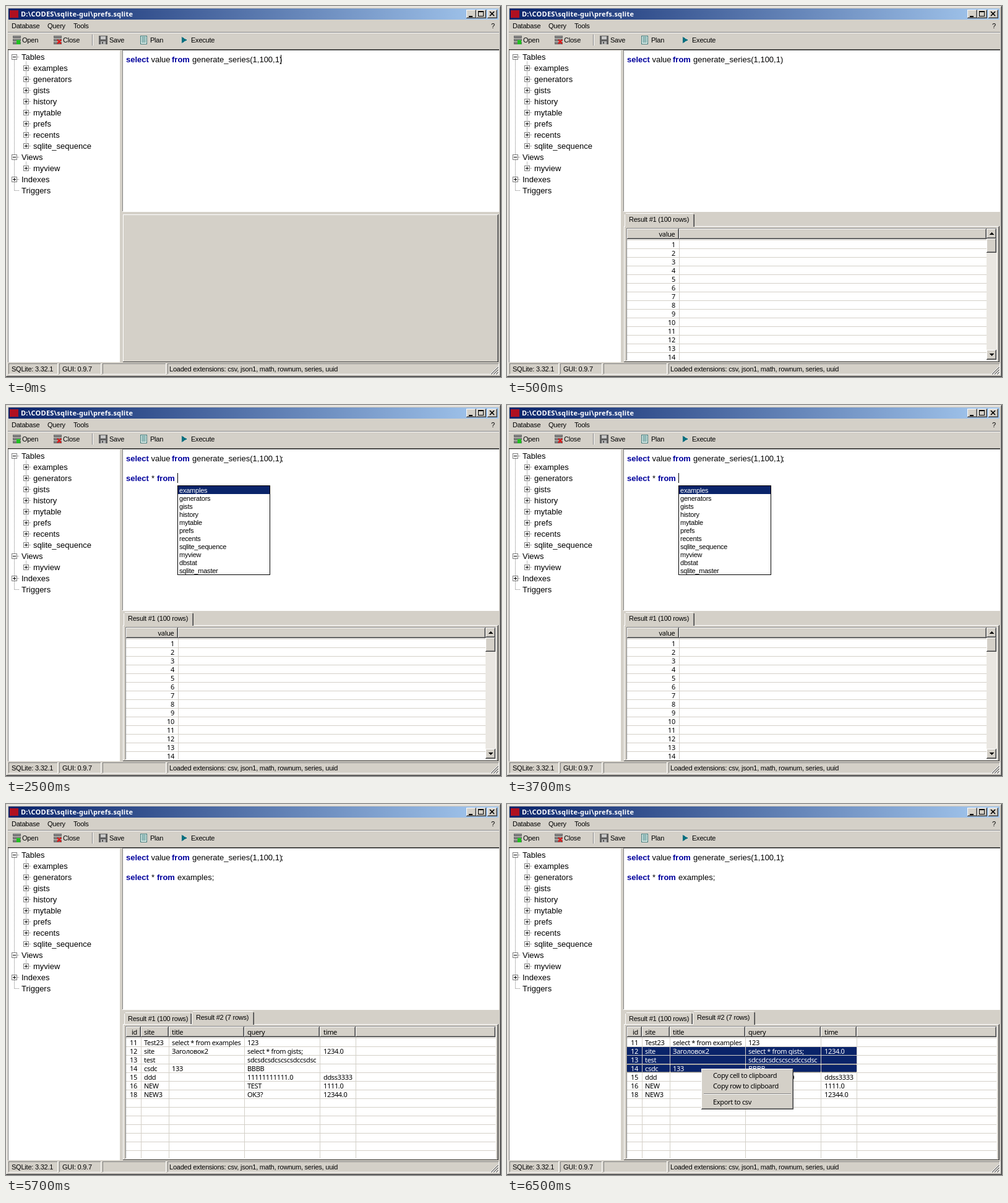
Animation, 800 px wide and 600 px high, one loop 8000 ms. Source, as an HTML page:

```html
<!DOCTYPE html>
<html lang="en">
<head>
<meta charset="utf-8">
<title>SQLite GUI</title>
<style>
html, body { margin: 0; width: 100%; height: 100%; overflow: hidden; background: #d4d0c8; }
svg { display: block; width: 800px; height: 600px; }
text { white-space: pre; }
.ui { font: 11px "Liberation Sans", Arial, sans-serif; letter-spacing: -.22px; }
.cell { font: 11px "Noto Sans", "Open Sans", sans-serif; letter-spacing: -.33px; }
.title { font: bold 11px "Noto Sans", "Open Sans", sans-serif; letter-spacing: .23px; }
.big { font: 13px "Liberation Sans", Arial, sans-serif; }
.key { font: bold 13px "Liberation Sans", Arial, sans-serif; }
.step { opacity: 0; animation: 8s step-end infinite; }
#start { animation-name: start; }
#series { animation-name: series; }
#second { animation-name: second; }
#complete { animation-name: complete; }
#examples { animation-name: examples; }
#menu { animation-name: menu; }
@keyframes start { 0% { opacity: 1 } 6.25%, 100% { opacity: 0 } }
@keyframes series { 0% { opacity: 0 } 6.25% { opacity: 1 } 56.25%, 100% { opacity: 0 } }
@keyframes second { 0% { opacity: 0 } 31.25%, 100% { opacity: 1 } }
@keyframes complete { 0% { opacity: 0 } 31.25% { opacity: 1 } 56.25%, 100% { opacity: 0 } }
@keyframes examples { 0% { opacity: 0 } 56.25%, 100% { opacity: 1 } }
@keyframes menu { 0% { opacity: 0 } 81.25%, 100% { opacity: 1 } }
</style>
</head>
<body>
<svg id="stage" viewBox="0 0 800 600" shape-rendering="crispEdges"></svg>
<script>
const FACE = '#d4d0c8', SHADE = '#808080', DARK = '#404040', WHITE = '#fff', NAVY = '#0a246a', LINE = '#d4d0c8';

const rect = (x, y, w, h, fill) => `<rect x="${x}" y="${y}" width="${w}" height="${h}" fill="${fill}"/>`;
const text = (x, y, s, cls = 'ui', fill = '#000', anchor = 'start') =>
  `<text x="${x}" y="${y}" class="${cls}" fill="${fill}" text-anchor="${anchor}">${s}</text>`;
const path = (d, fill) => `<path d="${d}" fill="${fill}"/>`;
const step = (id, body) => `<g id="${id}" class="step">${body}</g>`;
const dots = (x1, y1, x2, y2, color = SHADE) =>
  `<path d="M${x1} ${y1}L${x2} ${y2}" stroke="${color}" stroke-dasharray="1 1"/>`;

function edges(x, y, w, h, light, dark) {
  return rect(x, y, w, 1, light) + rect(x, y, 1, h, light) +
    rect(x, y + h - 1, w, 1, dark) + rect(x + w - 1, y, 1, h, dark);
}
const raised = (x, y, w, h) => rect(x, y, w, h, FACE) + edges(x, y, w, h, WHITE, DARK) +
  rect(x + 1, y + h - 2, w - 2, 1, SHADE) + rect(x + w - 2, y + 1, 1, h - 2, SHADE);
const sunken = (x, y, w, h) => edges(x, y, w, h, SHADE, WHITE);

function titleBar() {
  const button = (x, icon) => raised(x, 6, 16, 14) + icon;
  return rect(4, 4, 792, 18, 'url(#bar)') + rect(6, 7, 14, 12, '#b01020') +
    text(24, 17, 'D:\\CODES\\sqlite-gui\\prefs.sqlite', 'title', WHITE) +
    button(744, rect(748, 16, 6, 2, '#000')) +
    button(760, edges(763, 8, 9, 9, '#000', '#000') + rect(763, 9, 9, 1, '#000')) +
    button(778, '<path d="M782 9l7 7m0-7l-7 7" stroke="#000" stroke-width="1.7" shape-rendering="auto"/>');
}

function drawer(x) {
  return [48, 53, 58].map(y => rect(x, y, 13, 4, '#6c6c6c') + rect(x + 1, y + 1, 11, 1, '#969696')).join('');
}

function toolbar() {
  return text(9, 36, 'Database') + text(67, 36, 'Query') + text(109, 36, 'Tools') + text(784, 36, '?') +
    rect(3, 42, 794, 1, SHADE) + rect(3, 43, 794, 1, WHITE) +
    drawer(11) + rect(17, 55, 6, 7, '#20c020') + text(26, 59, 'Open') +
    drawer(77) + '<path d="M83 54.5l6 6.5m0-6.5l-6 6.5" stroke="#e01818" stroke-width="2.4" shape-rendering="auto"/>' +
    text(92, 59, 'Close') +
    rect(139, 46, 1, 18, SHADE) + rect(140, 46, 1, 18, WHITE) +
    rect(150, 48, 14, 14, '#606060') + rect(153, 49, 8, 5, '#c8c8c8') + rect(153, 57, 8, 5, '#b4b4b4') +
    rect(155, 58, 2, 3, '#505050') + text(167, 59, 'Save') +
    rect(217, 48, 11, 14, '#3c7878') + rect(218, 49, 9, 12, '#e8f4f0') +
    [50, 52, 54, 56, 58].map(y => rect(219, y, 7, 1, '#3c8080')).join('') + text(233, 59, 'Plan') +
    path('M284 50l9 5l-9 5z', '#087080') + text(299, 59, 'Execute') +
    rect(3, 70, 794, 1, '#202020');
}

function tree() {
  const names = ['Tables', 'examples', 'generators', 'gists', 'history', 'mytable', 'prefs', 'recents',
    'sqlite_sequence', 'Views', 'myview', 'Indexes', 'Triggers'];
  const box = (x, y, plus) => rect(x, y - 4, 9, 9, WHITE) + edges(x, y - 4, 9, 9, SHADE, SHADE) +
    rect(x + 2, y, 5, 1, '#000') + (plus ? rect(x + 4, y - 2, 1, 5, '#000') : '');
  let out = rect(4, 72, 180, 504, WHITE) + rect(3, 71, 1, 505, SHADE) +
    dots(13.5, 87, 13.5, 299) + dots(32.5, 90, 32.5, 227) + dots(32.5, 252, 32.5, 263);
  names.forEach((name, i) => {
    const y = 82 + 18 * i, root = [0, 9, 11, 12].includes(i), x = root ? 9 : 28;
    out += dots(x + 5, y + .5, x + 13, y + .5);
    if (i < 12) out += box(x, y, i !== 0 && i !== 9);
    out += text(root ? 25 : 44, y + 5, name, 'big');
  });
  return out;
}

const key = (x, y, s) => text(x, y, s, 'key', '#00009c');

function editor() {
  return rect(188, 71, 609, 262, WHITE) + rect(188, 71, 609, 1, SHADE) + rect(188, 71, 1, 261, SHADE) +
    key(194, 91, 'select') + text(234.5, 91, 'value', 'big') + key(268, 91, 'from') +
    text(301, 91, 'generate_series(1,100,1)', 'big');
}

function statusBar() {
  const panels = [[4, 80, 'SQLite: 3.32.1'], [86, 68, 'GUI: 0.9.7'], [156, 103, ''],
    [261, 536, 'Loaded extensions: csv, json1, math, rownum, series, uuid']];
  return panels.map(([x, w, s]) => sunken(x, 578, w, 18) + text(x + (x === 261 ? 3 : 5), 591, s)).join('') +
    [0, 4, 8].map(d => `<path d="M${784 + d} 595.5L795.5 ${584 + d}" stroke="${SHADE}" stroke-width="1.6"/>` +
      `<path d="M${783 + d} 595L795 ${583 + d}" stroke="#fff"/>`).join('');
}

function tab(x, y, w, h, s, base, tx) {
  return rect(x, y, w, h, FACE) + rect(x, y + 2, 1, h - 2, WHITE) + rect(x + 2, y, w - 4, 1, WHITE) +
    rect(x + w - 2, y + 2, 1, h - 2, SHADE) + rect(x + w - 1, y + 2, 1, h - 2, DARK) + text(tx, base, s);
}

const panel = y => rect(189, y, 607, 576 - y, FACE) + edges(189, y, 607, 576 - y, WHITE, DARK) +
  rect(794, y + 1, 1, 574 - y, SHADE);

function grid(right, cols) {
  let out = rect(193, 359, 599, 215, WHITE) + sunken(193, 359, 599, 215);
  for (let y = 378; y < 574; y += 14) out += rect(194, y, right - 194, 1, LINE);
  let left = 194;
  for (const x of [...cols, right]) {
    out += raised(left, 360, x - left, 17);
    if (x < right) out += rect(x, 377, 1, 196, LINE);
    left = x;
  }
  return out;
}

function scrollBar() {
  return rect(775, 360, 16, 213, '#eae7e2') +
    raised(775, 360, 16, 16) + path('M779 370h8l-4-4z', '#000') +
    raised(775, 376, 16, 23) +
    raised(775, 556, 16, 16) + path('M779 562h8l-4 4z', '#000');
}

function seriesResult() {
  let out = panel(356) + tab(190, 335, 113, 22, 'Result #1 (100 rows)', 349, 197) +
    grid(775, [278]) + text(271.5, 373, 'value', 'cell', '#000', 'end');
  for (let n = 1; n <= 14; n++) out += text(272, 376 + 14 * n, n, 'cell', '#000', 'end');
  return out + scrollBar();
}

const rows = [
  [11, 'Test23', 'select * from examples', '123', ''],
  [12, 'site', 'Заголовок2', 'select * from gists;', '1234.0'],
  [13, 'test', '', 'sdcsdcsdcscscsdccsdsc', ''],
  [14, 'csdc', '133', 'BBBB', ''],
  [15, 'ddd', '', '11111111111.0', 'ddss3333'],
  [16, 'NEW', '', 'TEST', '1111.0'],
  [18, 'NEW3', '', 'OK3?', '12344.0']
];
const bounds = [194, 218, 263, 385, 507, 565];
const starts = [212, 223, 268, 390, 513];
const rowText = (cells, y, fill) =>
  cells.map((s, i) => text(starts[i], y, s, 'cell', fill, i ? 'start' : 'end')).join('');

function examplesResult() {
  return rect(189, 334, 608, 242, FACE) + panel(356) +
    tab(191, 337, 109, 19, 'Result #1 (100 rows)', 351, 197) +
    tab(300, 335, 101, 22, 'Result #2 (7 rows)', 349, 307) +
    grid(791, bounds.slice(1)) + rowText(['id', 'site', 'title', 'query', 'time'], 373) +
    rows.map((r, i) => rowText(r, 390 + 14 * i)).join('');
}

function selection() {
  let out = '';
  for (let i = 1; i < 4; i++) {
    const y = 379 + 14 * i;
    for (let c = 0; c < 5; c++) {
      const x = bounds[c] + (c ? 1 : 0);
      out += rect(x, y, bounds[c + 1] - x, 13, NAVY);
    }
    out += rowText(rows[i], y + 11, WHITE);
  }
  out += dots(194, 421.5, 565, 421.5, '#f5db95') + dots(194, 433.5, 565, 433.5, '#f5db95');
  return out + raised(314, 428, 149, 66) +
    text(333, 443, 'Copy cell to clipboard', 'cell') + text(333, 460, 'Copy row to clipboard', 'cell') +
    rect(318, 468, 141, 1, SHADE) + rect(318, 469, 141, 1, WHITE) + text(333, 486, 'Export to csv', 'cell');
}

function completion() {
  const words = ['examples', 'generators', 'gists', 'history', 'mytable', 'prefs', 'recents',
    'sqlite_sequence', 'myview', 'dbstat', 'sqlite_master'];
  return rect(277, 110, 1, 16, '#000') +
    rect(277, 130, 150, 145, WHITE) + edges(277, 130, 150, 145, '#000', '#000') + rect(278, 131, 148, 13, NAVY) +
    words.map((w, i) => text(280, 142 + 13 * i, w, 'ui', i ? '#000' : WHITE)).join('');
}

document.getElementById('stage').innerHTML =
  `<defs><linearGradient id="bar"><stop stop-color="${NAVY}"/><stop offset="1" stop-color="#a6caf0"/></linearGradient></defs>` +
  rect(0, 0, 800, 600, FACE) + edges(0, 0, 800, 600, FACE, DARK) + edges(1, 1, 798, 598, WHITE, SHADE) +
  titleBar() + toolbar() + tree() + editor() + statusBar() +
  step('start', panel(337) + rect(444, 79, 1, 15, '#000')) +
  step('series', seriesResult()) +
  step('second', text(444.5, 91, ';', 'big') + key(194, 123, 'select') + text(235, 123, '*', 'big') + key(244, 123, 'from')) +
  step('complete', completion()) +
  step('examples', text(277, 123, 'examples;', 'big') + examplesResult()) +
  step('menu', selection());
</script>
</body>
</html>
```
